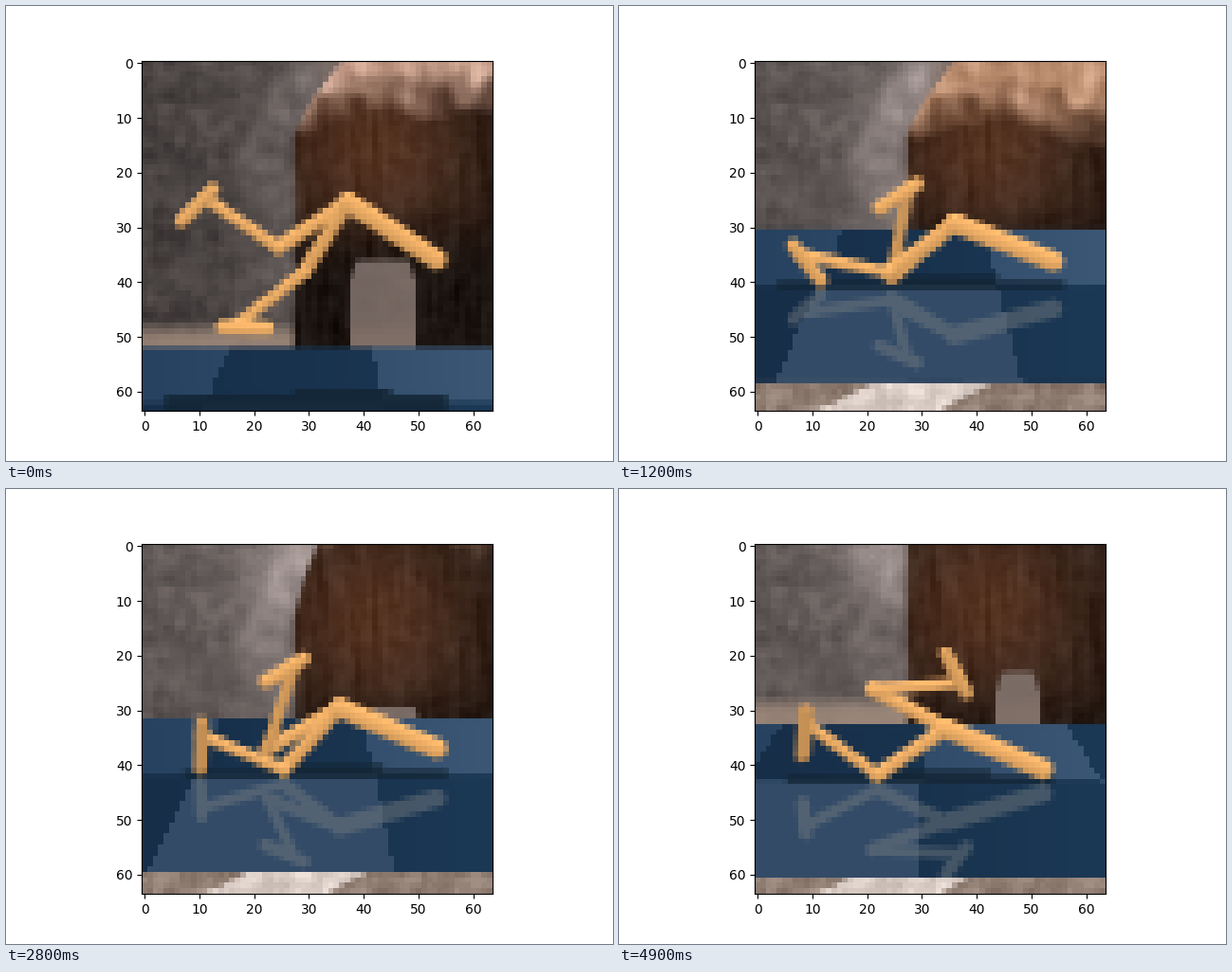
Write a matplotlib script that moves like this. It is 640 px wide and 480 px high and loops after 5 s.

```python
import numpy as np
import matplotlib.pyplot as plt
from matplotlib.animation import FuncAnimation

SIZE, FRAMES, INTERVAL = 64, 50, 100
Y, X = np.mgrid[0:SIZE, 0:SIZE].astype(float)

# Walker: segment lengths, thicknesses and the point its camera keeps centred.
TORSO, THIGH, SHIN, HEEL, TOE = 19.2, 15.2, 16.2, 2, 6
CENTER = np.array([29.3, 33.1])
FALL_HEIGHT, FALL_FRAMES = 12.7, 7

# A few key poses: segment directions in degrees, clockwise from the right.
KEY_FRAMES = [0, 8, 16, 22, 35, 43, 49]
DIRECTIONS = {
    "torso": [33, 32, 10, 20, 26, 37, 23],
    "near thigh": [122, 125, 163, 156, 105, 127, 146],
    "near shin": [142, 182, 201, 205, 200, 202, 216],
    "near foot": [2, 42, 62, 61, 128, 121, 94],
    "far thigh": [147, 116, 163, 160, 139, 154, 208],
    "far shin": [214, 267, 294, 303, 270, 270, 356],
    "far foot": [135, 118, 177, 164, 131, 193, 242],
}


def blur(field, steps):
    for _ in range(steps):
        field = sum(np.roll(field, s, a) for s in (-1, 0, 1) for a in (0, 1))
        field = field / field.std()
    return field


noise = np.random.default_rng(4).normal(size=(SIZE, SIZE))
grain, blotches = blur(noise, 1), blur(noise[::-1], 4)
streaks = sum(np.roll(grain, k, 0) for k in range(8)) / 4


def ramp(frame, start, end):
    return float(np.clip((frame - start) / (end - start), 0, 1))


def soft(low, high, v):
    """Antialiased band from low to high."""
    return np.clip(v - low + .5, 0, 1) * np.clip(high - v + .5, 0, 1)


def mix(img, color, weight):
    weight = np.asarray(weight)[..., None]
    return img + (np.asarray(color, float) - img) * weight


def heading(frame, name):
    a = np.radians(np.interp(frame, KEY_FRAMES, DIRECTIONS[name]))
    return np.array([np.cos(a), np.sin(a)])


def pose(frame):
    """Limbs as (start, end, radius, mass), centred on the centre of mass."""
    hip = np.zeros(2)
    limbs = []
    for side in ("far", "near"):
        knee = hip + THIGH * heading(frame, side + " thigh")
        ankle = knee + SHIN * heading(frame, side + " shin")
        foot = heading(frame, side + " foot")
        limbs += [(hip, knee, 1.35, 1.5), (knee, ankle, 1.1, 1),
                  (ankle - HEEL * foot, ankle + TOE * foot, 1.3, .7)]
    limbs.append((hip, TORSO * heading(frame, "torso"), 1.85, 2))
    mass = sum(m for *_, m in limbs)
    move = CENTER - sum(m * (a + b) / 2 for a, b, _, m in limbs) / mass
    return [(a + move, b + move, r) for a, b, r, _ in limbs]


def capsule(a, b, radius):
    d = b - a
    s = np.clip(((X - a[0]) * d[0] + (Y - a[1]) * d[1]) / (d @ d), 0, 1)
    dy = Y - a[1] - s * d[1]
    dist = np.hypot(X - a[0] - s * d[0], dy)
    cover = np.clip(radius - dist + .5, 0, 1)
    level = abs(d[0]) / np.hypot(*d)
    return cover, .76 + .19 * level - .14 * np.clip(dy / radius, -1, 1)


def backdrop(frame):
    wake, turn = ramp(frame, 0, 16), ramp(frame, 22, 34)
    edge = 27.3 + 8.5 * (1 - turn) * np.clip(1 - Y / 14, 0, 1) ** 1.4

    # rock wall with a pale patch beside the animal
    pale = np.exp(-((X - edge + 4) / 6.5) ** 2 - (Y / (30 - 19 * turn)) ** 2)
    tone = 70 + 23 * wake + .6 * X + (22 + 34 * wake) * pale
    tone = tone + 4 * grain + 5 * blotches
    img = tone[..., None] * np.array([1, .92, .905])
    ground = 47 - 20 * turn
    img = mix(img, (165, 142, 127), np.clip((Y - ground) / 4, 0, .8))

    # dark fur, sunlit along the back until the animal turns
    warm = np.exp(-((X - 42) / 17) ** 2 - ((Y - 15 + 4 * turn) / 16) ** 2)
    fur = np.array([44, 30, 23]) + warm[..., None] * np.array([42, 22, 11])
    fur = mix(fur, (24, 18, 15), np.clip((Y - 26) / 16, 0, .9))
    sun = 10 + 3 * wake - 32 * turn + wake * np.clip((X - 46) / 3, 0, 4)
    rim = 4 * np.exp(-np.maximum(X - edge, 0) / 5)
    lit = np.clip((sun + rim - Y + blotches) / 10, 0, .95)
    fur = mix(fur, (203 - 12 * wake, 162 - 20 * wake, 142 - 34 * wake), lit)
    fur += (4 * streaks + 2 * grain + 12 * lit * blotches)[..., None]

    gap_x, gap_y = 43.5 + 4 * turn, 36 - 13 * turn
    width = 6 - 2 * turn - .3 * np.maximum(0, gap_y + 4 - Y)
    gap = soft(gap_x - width, gap_x + width, X) * np.clip(Y - gap_y + .5, 0, 1)
    body = np.clip(X - edge + .5, 0, 1) * (1 - gap)
    behind = mix(img, (122, 106, 99), np.clip((X - 30) / 5, 0, .8))
    return mix(behind, fur, body)


def add_floor(img, frame, seam):
    top, bottom = seam - 10.6, seam + 18.2

    strip = np.full((SIZE, SIZE, 3), (140., 122, 111))
    strip = mix(strip, (222, 210, 203), .9 * soft(18, 40, X + 2 * (Y - 60)))
    strip += (7 * grain + 7 * blotches)[..., None]
    img = np.where((Y > bottom)[..., None], strip, img)

    # checkered tiles in perspective, sliding as the walker moves
    slide = .36 - .42 * ramp(frame, 16, 49) ** 2
    column = np.floor((X - 32) / (25.3 + .69 * (Y - top)) - slide)
    near = np.clip(Y - seam + .5, 0, 1)
    bright = np.where(column % 2 == 0, 1 - near, near)
    dark = np.stack([23 + .06 * X, 46 + .16 * X, 72 + .2 * X], -1)
    far_tile = np.stack([38 + .33 * X, 66 + .33 * X, 96 + .33 * X], -1)
    light = mix(far_tile, (51, 75, 103), near)
    tiles = mix(dark, light, bright)
    return mix(img, tiles, soft(top + .5, bottom - .3, Y)), bottom


def render(frame):
    limbs = pose(frame)
    lowest = max(p[1] for a, b, _ in limbs for p in (a, b))
    drop = FALL_HEIGHT * (1 - ramp(frame, 0, FALL_FRAMES) ** 2)
    seam = lowest + .8 + drop
    img, bottom = add_floor(backdrop(frame), frame, seam)

    # mirror image in the near tiles
    mirror = np.zeros((SIZE, SIZE))
    for a, b, r in limbs:
        flip = [np.array([x, seam + 1.3 + .7 * (seam - y)]) for x, y in (a, b)]
        mirror = np.maximum(mirror, capsule(*flip, r * .9)[0])
    glossy = (Y > seam + .5) & (Y < bottom)
    img = mix(img, (122, 128, 131), .45 * mirror * glossy)

    # cast shadow
    xs = [p[0] for a, b, _ in limbs for p in (a, b)]
    hip = limbs[-1][0][0]
    half = .75 + .06 * drop
    wide = soft(min(xs) - 3, max(xs) + 2, X) * soft(seam - half, seam + half, Y)
    core = soft(hip - 10, hip + 8, X) * soft(seam - half - 1, seam, Y)
    img = mix(img, (19, 37, 53), .85 * np.maximum(wide, core))

    for a, b, r in limbs:
        cover, light = capsule(a, b, r)
        img = mix(img, light[..., None] * np.array([255, 187, 110]), cover)
    return np.clip(img, 0, 255).astype(np.uint8)


fig, ax = plt.subplots(figsize=(6.4, 4.8), dpi=100)
picture = ax.imshow(render(0))


def update(frame):
    picture.set_data(render(frame))
    return [picture]


animation = FuncAnimation(fig, update, frames=FRAMES, interval=INTERVAL,
                          repeat=True, repeat_delay=0)
plt.show()
```
